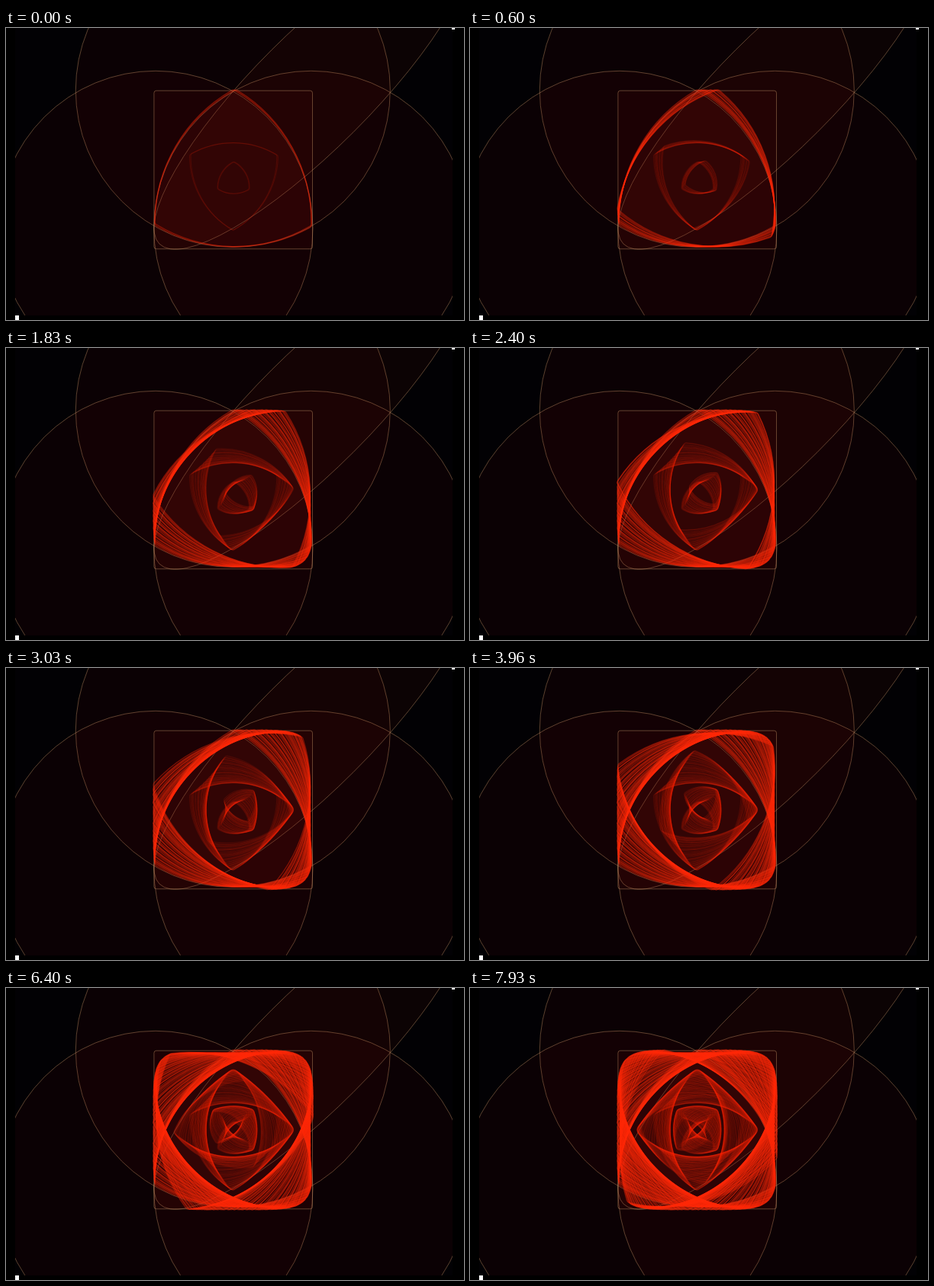
An HTML page with a canvas for the animation above (8000 ms loop, 600x383 px).

```html
<!DOCTYPE html>
<html lang="en">
<head>
<meta charset="utf-8">
<title>Reuleaux triangle turning in a square</title>
<style>
  html, body { margin: 0; width: 100%; height: 100%; overflow: hidden; background: #000; }
  canvas { display: block; }
</style>
</head>
<body>
<canvas id="stage" width="600" height="383"></canvas>
<script>
const ctx = document.getElementById('stage').getContext('2d');
const LOOP = 8000, DEG = Math.PI / 180;
const CENTER = { x: 297.7, y: 186 }, HALF = 103.8, ORBIT = 13.3;
const LINE = 'rgba(190,142,98,.46)';

// Nested triangles: tip distance, corner radius, starting direction, stroke
const TRIANGLES = [
  { tip: 118, corner: 4, start: -90, alpha: 0.4, width: 1.4 },
  { tip: 65.5, corner: 3, start: 90, alpha: 0.13, width: 1.25 },
  { tip: 23.5, corner: 3, start: -90, alpha: 0.13, width: 1.1 },
];

function reuleaux({ tip, corner, start }, turn) {
  // The centroid circles the square's centre three times as fast, backwards
  const cx = CENTER.x + ORBIT * Math.sin(3 * turn * DEG);
  const cy = CENTER.y + ORBIT * Math.cos(3 * turn * DEG);
  const core = tip - corner, side = core * Math.sqrt(3);
  const arcAt = (vertex, normal, radius) => ctx.arc(
    cx + core * Math.cos(vertex * DEG), cy + core * Math.sin(vertex * DEG),
    radius, (normal - 30) * DEG, (normal + 30) * DEG);
  ctx.beginPath();
  for (let k = 0; k < 3; k++) {
    const a = start + turn + 120 * k;
    arcAt(a, a, corner);
    arcAt(a + 240, a + 60, side + corner);
  }
  ctx.closePath();
}

function paint(fill) {
  ctx.fillStyle = fill;
  ctx.fill();
  ctx.strokeStyle = LINE;
  ctx.lineWidth = 1;
  ctx.stroke();
}

function drawConstruction() {
  const left = CENTER.x - HALF, top = CENTER.y - HALF;
  for (const [x, y] of [[297.3, 81.5], [196, 262.3], [399.7, 262.3]]) {
    ctx.beginPath();
    ctx.arc(x, y, 206, 0, 2 * Math.PI);
    paint('rgba(165,12,6,.055)');
  }
  // Ellipse about the square's top right corner that rounds the opposite one
  ctx.beginPath();
  ctx.ellipse(left + 2 * HALF, top + 0.5, HALF * (Math.sqrt(3) + 1), HALF * (Math.sqrt(3) - 1),
    -45 * DEG, 0, 2 * Math.PI);
  paint('rgba(170,40,8,.06)');
  ctx.beginPath();
  ctx.roundRect(left, top, 2 * HALF, 2 * HALF, 3);
  paint('rgba(130,10,5,.08)');
}

function angleAt(t) {
  return t < 1130 ? 1 + 17.5 * t / 1130 : 18.5 + 12.5 * (t - 1130) / 1000;
}

// About one stroke per degree, unevenly spaced so that the trail looks combed
const strokeAngle = i => i + 0.4 * Math.sin(7 * i * i);

function draw(count) {
  ctx.fillStyle = '#000';
  ctx.fillRect(0, 0, 600, 383);
  ctx.save();
  ctx.beginPath();
  ctx.rect(12, 0, 573, 377);
  ctx.clip();
  ctx.fillStyle = '#020104';
  ctx.fillRect(0, 0, 600, 383);
  drawConstruction();

  reuleaux(TRIANGLES[0], strokeAngle(count));
  ctx.fillStyle = 'rgba(110,20,8,.12)';
  ctx.fill();
  for (const triangle of TRIANGLES) {
    ctx.strokeStyle = `rgba(255,42,8,${triangle.alpha})`;
    ctx.lineWidth = triangle.width;
    for (let i = 0; i <= count; i++) {
      reuleaux(triangle, strokeAngle(i));
      ctx.stroke();
    }
  }
  ctx.restore();

  ctx.fillStyle = '#fff';
  ctx.fillRect(12, 377, 5, 6);
  ctx.fillRect(584, 0, 4, 2);
}

let shown = -1;
function frame() {
  const count = Math.floor(angleAt(performance.now() % LOOP));
  if (count !== shown) draw(shown = count);
  requestAnimationFrame(frame);
}
frame();
</script>
</body>
</html>
```
